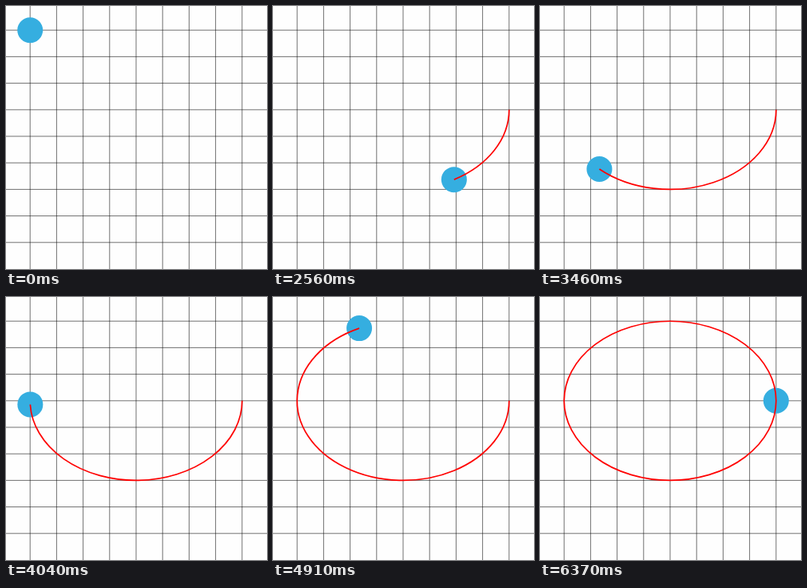
Write an HTML page that moves like this. It is 327x329 px and loops after 7560 ms.

```html
<!DOCTYPE html>
<html lang="en">
<head>
<meta charset="utf-8">
<title>Ellipse trace</title>
<style>
  html, body { margin: 0; width: 100%; height: 100%; overflow: hidden; background: #fefefe; }
  svg { display: block; width: 100%; height: 100%; }
</style>
</head>
<body>
<svg viewBox="0 0 327 329">
  <path id="grid" fill="none" stroke="#111" stroke-width=".6"/>
  <circle id="badge" r="16" fill="#35aee0"/>
  <path id="trail" fill="none" stroke="#f00" stroke-width="1.7" stroke-linejoin="round"/>
</svg>
<script>
  const LOOP = 7560, START = 1780, END = 6370;
  const CELL = 33.2, ORIGIN = 30.2;
  const at = n => ORIGIN + n * CELL;
  const cx = at(4), cy = at(3), rx = 4 * CELL, ry = 3 * CELL;

  const [grid, badge, trail] = ['grid', 'badge', 'trail'].map(id => document.getElementById(id));

  let lines = '';
  for (let i = 0; i < 9; i++) lines += `M${at(i)} 0V329M0 ${at(i)}H327`;
  grid.setAttribute('d', lines);

  const point = a => [cx + rx * Math.cos(a), cy + ry * Math.sin(a)];

  function arc(angle) {
    // Two halves, so that the full turn can also be drawn.
    const mid = point(angle / 2), end = point(angle);
    const radii = `A${rx} ${ry} 0 0 1 `;
    return `M${point(0)}${radii}${mid}${radii}${end}`;
  }

  function draw(time) {
    const t = time % LOOP;
    const moving = t >= START + 10;
    const angle = 2 * Math.PI * Math.min(1, Math.max(0, (t - START) / (END - START)));
    const [x, y] = moving ? point(angle) : [at(0), at(0)];
    badge.setAttribute('cx', x);
    badge.setAttribute('cy', y);
    trail.setAttribute('d', moving ? arc(angle) : '');
  }

  const begin = performance.now();
  function tick() {
    draw(performance.now() - begin);
    requestAnimationFrame(tick);
  }
  tick();
</script>
</body>
</html>
```
